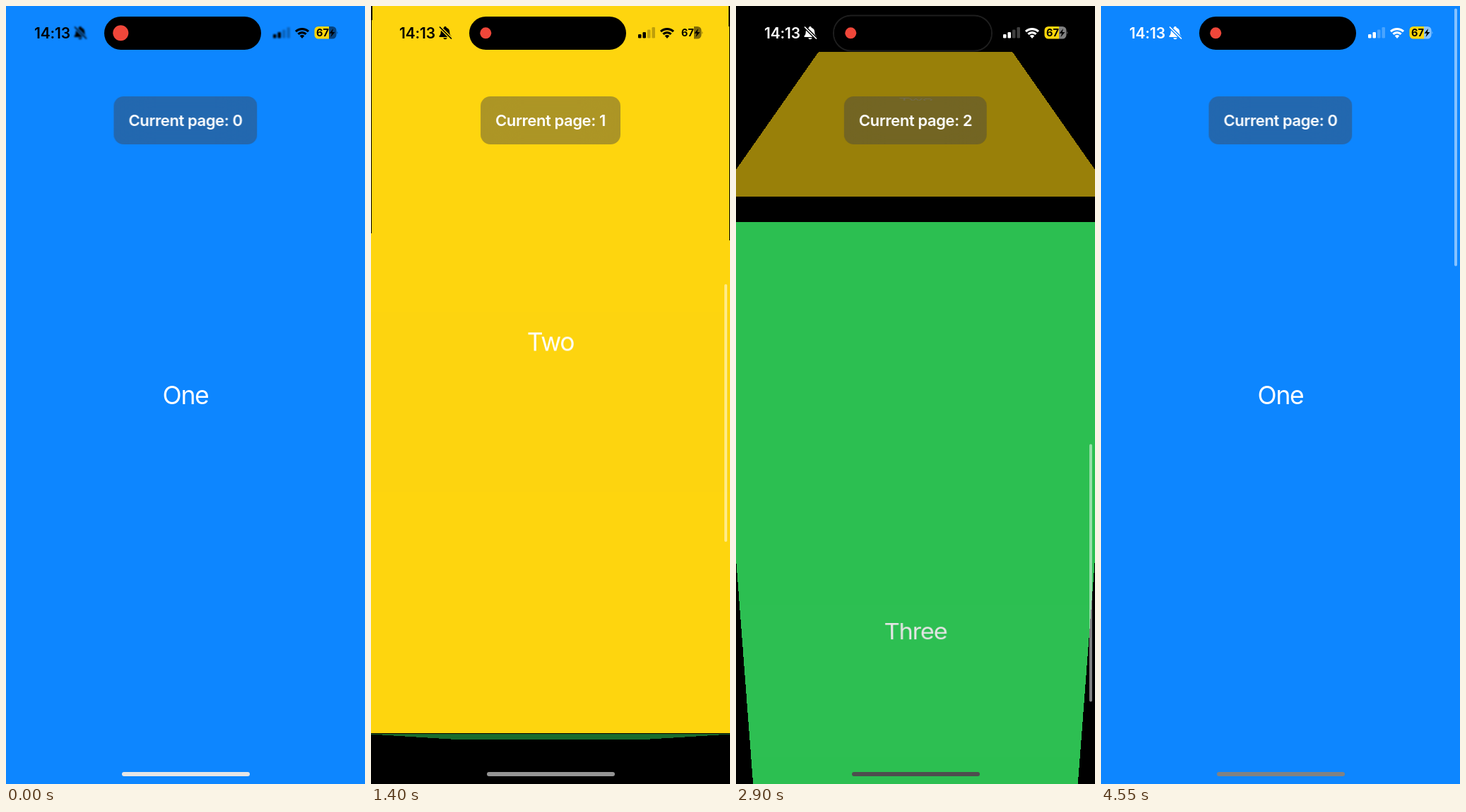
Animation, 508 px wide and 1102 px high, one loop 4.7 s. Source, as an HTML page:

```html
<!DOCTYPE html>
<html lang="en">
<head>
<meta charset="utf-8">
<title>Vertical page flip</title>
<style>
  html, body { margin: 0; width: 100%; height: 100%; overflow: hidden; background: #000; }
  body { font-family: Inter, Roboto, sans-serif; }
  #stage { position: relative; width: 508px; height: 1102px; overflow: hidden; background: #000; }
  #stage > * { position: absolute; }
  .page {
    left: 0; top: 0; width: 508px; height: 1102px;
    display: flex; align-items: center; justify-content: center;
    color: #fff; font-size: 35.5px; letter-spacing: -1.3px;
  }
  #label {
    left: 50%; top: 128px; height: 68px; padding: 0 21px; transform: translateX(-50%);
    border-radius: 14px; background: rgba(66, 66, 70, .43);
    -webkit-backdrop-filter: blur(26px); backdrop-filter: blur(26px);
    color: #fff; font-size: 22px; font-weight: 600; line-height: 68px;
    letter-spacing: -.4px; white-space: nowrap;
  }
  #bar { left: 500px; top: 0; width: 4px; height: 365px; border-radius: 2px; background: rgba(255, 255, 255, .5); }
  #home { left: 164px; top: 1085px; width: 181px; height: 6px; border-radius: 3px; }
  svg { left: 0; top: 0; }
  svg text { font-weight: 600; }
</style>
</head>
<body>
<div id="stage">
  <div class="page" style="background:#0d86ff">One</div>
  <div class="page" style="background:#ffd60f">Two</div>
  <div class="page" style="background:#32d55b">Three</div>
  <div id="label"></div>
  <div id="bar"></div>
  <svg width="508" height="80" viewBox="0 0 508 80">
    <mask id="cut">
      <rect x="90" y="20" width="32" height="36" fill="#fff"/>
      <path d="M97 29.5 114 46.5" stroke="#000" stroke-width="4.5"/>
    </mask>
    <g id="left">
      <text x="40" y="45.5" font-size="21" letter-spacing="-.2">14:13</text>
      <g id="bell">
        <path mask="url(#cut)" d="M105 29c1.2 0 1.8.7 1.8 1.7 3 .8 4.4 3.2 4.5 6.3.1 3 .8 4.2 2 5.3.7.7.3 1.7-.7 1.7H97.4c-1 0-1.4-1-.7-1.7 1.2-1.1 1.9-2.3 2-5.3.1-3.100 1.5-5.5 4.5-6.3 0-1 .6-1.7 1.8-1.7zM102.3 45.200h5.400c-.3 1.200-1.3 2-2.7 2s-2.400-.8-2.700-2z"/>
        <path d="M97.5 30 113.5 46" fill="none" stroke="currentColor" stroke-width="1.7" stroke-linecap="round"/>
      </g>
    </g>
    <g id="right">
      <g id="signal">
        <rect x="378" y="40" width="4.5" height="5.5" rx="1.3"/>
        <rect x="384.5" y="37" width="4.5" height="8.5" rx="1.3"/>
        <rect x="391" y="33.5" width="4.5" height="12" rx="1.3" opacity=".25"/>
        <rect x="397.5" y="30" width="4.5" height="15.5" rx="1.3" opacity=".25"/>
      </g>
      <g fill="none" stroke="currentColor" stroke-width="3.2">
        <path d="M410 36.2a13 13 0 0 1 18 0M413.4 39.9a8 8 0 0 1 11.2 0"/>
      </g>
      <path d="M415.7 42.3a4.7 4.7 0 0 1 6.6 0L419 46z"/>
      <path d="M457 29h5a5.5 5.5 0 0 1 5.5 5.5v6.5a5.5 5.5 0 0 1-5.5 5.5h-5z" opacity=".5"/>
      <path d="M468.5 35.5q1.8 2.2 0 4.5z" opacity=".5"/>
    </g>
    <path d="M457 29h-15a5.5 5.5 0 0 0-5.5 5.5v6.5a5.5 5.5 0 0 0 5.5 5.5h15z" fill="#ffd60a"/>
    <text x="448" y="43" font-size="14.5" text-anchor="middle" style="font-weight:700">67</text>
    <path d="M463 32 457.5 38.8h3.5l-1.5 5.2 6-7h-3.7z"/>
    <rect id="rim" x="138" y="13.5" width="224" height="50" rx="25" fill="#000" stroke="#1e1e1e" stroke-width="2"/>
    <rect x="139" y="15" width="222" height="47" rx="23.5"/>
    <circle id="rec" cx="162.3" cy="38.3" fill="#f0473a"/>
  </svg>
  <div id="home"></div>
</div>
<script>
const LOOP = 4700, H = 1102;
const $ = id => document.getElementById(id);
const pages = [...document.querySelectorAll('.page')];
const clamp = (v, a = 0, b = 1) => Math.min(b, Math.max(a, v));
const ramp = (v, a, b) => clamp((v - a) / (b - a));

// Piecewise linear track of [time, value] pairs
function track(keys, t) {
  let i = 0;
  while (i < keys.length - 2 && t > keys[i + 1][0]) i++;
  const [t0, v0] = keys[i], [t1, v1] = keys[i + 1];
  return v0 + (v1 - v0) * ramp(t, t0, t1);
}

// One swipe: drag, flick, settle (monotone cubic through these points)
const SWIPE = [[0, 0], [50, .05], [100, .1635], [150, .308], [200, .55], [260, .8365],
  [300, .9273], [350, .972], [400, .993], [450, 1]];
const SWIPE_TIME = 450;
const slope = SWIPE.slice(1).map((p, i) => (p[1] - SWIPE[i][1]) / (p[0] - SWIPE[i][0]));
const tangent = SWIPE.map((_, i) => {
  const a = slope[i - 1], b = slope[i];
  return a && b ? 2 * a * b / (a + b) : 0;
});
function swipe(t) {
  if (t <= 0) return 0;
  if (t >= SWIPE_TIME) return 1;
  const i = SWIPE.findIndex(p => p[0] > t) - 1;
  const [x0, y0] = SWIPE[i], [x1, y1] = SWIPE[i + 1];
  const h = x1 - x0, u = (t - x0) / h, v = 1 - u;
  return y0 * v * v * (1 + 2 * u) + y1 * u * u * (3 - 2 * u)
    + h * u * v * (v * tangent[i] - u * tangent[i + 1]);
}
const scrollAt = t => swipe(t - 500) + swipe(t - 1340) - swipe(t - 2750) - swipe(t - 3100);

// cubic-bezier(.42, 0, .58, 1)
function easeInOut(x) {
  let lo = 0, hi = 1;
  for (let i = 0; i < 24; i++) {
    const u = (lo + hi) / 2, v = 1 - u;
    if (1.26 * v * v * u + 1.74 * v * u * u + u * u * u < x) lo = u; else hi = u;
  }
  return lo * lo * (3 - 2 * lo);
}

// Each page turns up to 90 degrees while its anchor slides to the shared edge
function placePage(el, d) {
  const far = Math.abs(d) >= .9995;
  el.style.visibility = far ? 'hidden' : 'visible';
  if (far) return;
  const e = easeInOut(Math.abs(d)) * Math.sign(d);
  el.style.transformOrigin = `50% ${50 - 50 * e}%`;
  el.style.transform = e
    ? `translateY(${d * H}px) perspective(${H}px) rotateX(${-90 * e}deg)` : 'none';
  el.style.opacity = 1 - Math.abs(e) / 2;
}

const LEFT = [[1620, 0], [1780, 255], [3080, 255], [3200, 48], [3280, 20], [3400, 165], [3500, 255]];
const RIGHT = [[1620, 0], [1780, 255], [3000, 255], [3150, 0], [3250, 0], [3380, 255]];
const HOME = [[0, 230], [800, 172], [1600, 140], [2600, 90], [2900, 78], [3200, 34], [3400, 120], [4550, 130]];
const gray = v => `rgb(${v},${v},${v})`;

function tint(el, v) {
  el.style.color = el.style.fill = gray(v);
}

function draw(t) {
  const s = scrollAt(t), frac = s - Math.floor(s);
  pages.forEach((el, i) => placePage(el, i - s));
  $('label').textContent = 'Current page: ' + Math.round(s);
  $('bar').style.transform = `translateY(${3.5 + s * 365.5}px)`;
  $('bar').style.opacity = ramp(t, 480, 560);
  $('home').style.background = gray(track(HOME, t));
  tint($('left'), track(LEFT, t));
  tint($('right'), track(RIGHT, t));
  const soft = 1.3 * (1 - ramp(t, 50, 200));
  for (const id of ['bell', 'signal']) $(id).style.filter = soft ? `blur(${soft}px)` : 'none';
  $('rim').style.opacity = ramp(frac, .63, .68) * (1 - ramp(frac, .94, .97));
  $('rec').setAttribute('r', 11 - 3 * ramp(t, 50, 400));
}

const start = performance.now();
function frame() {
  draw((performance.now() - start) % LOOP);
  requestAnimationFrame(frame);
}
draw(0);
requestAnimationFrame(frame);
</script>
</body>
</html>
```
